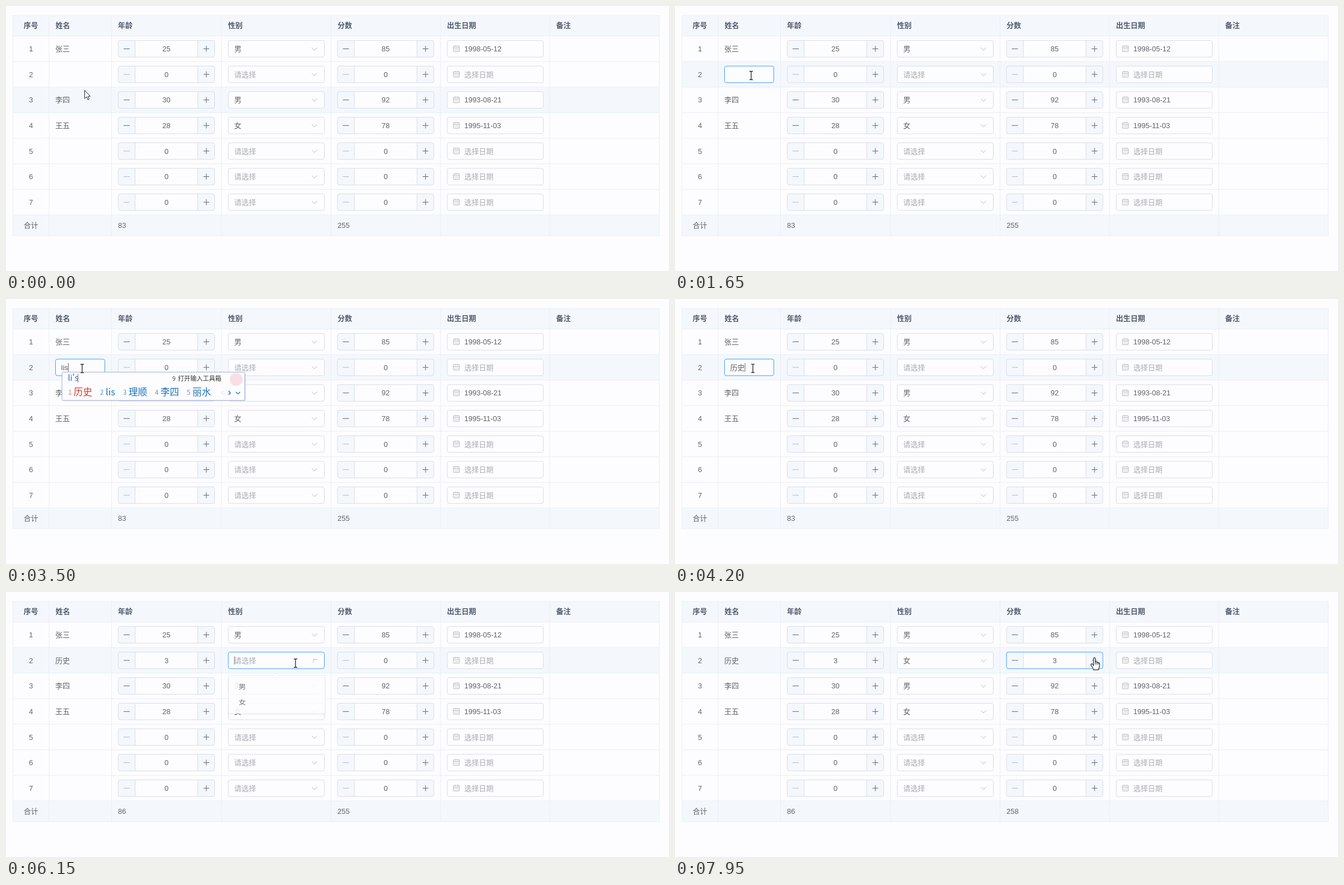
These frames come from a looping animation (1184x473 px, 8000 ms). An HTML page:

```html
<!DOCTYPE html>
<html lang="zh-CN">
<head>
<meta charset="utf-8">
<title>可编辑表格</title>
<style>
  html, body { margin: 0; width: 100%; height: 100%; overflow: hidden; background: #fdfdff; }
  svg { display: block; width: 100vw; height: 100vh; }
  text { font: 13px "Liberation Sans", "Noto Sans CJK SC", "Noto Sans CJK", sans-serif; fill: #606266; white-space: pre; }
  .head { font-weight: 700; fill: #515a6e; }
  .hint { fill: #a8abb2; }
  .ime text { font-family: "Noto Sans CJK SC", "Noto Sans CJK", sans-serif; }
</style>
</head>
<body>
<svg viewBox="0 0 1184 473">
  <g id="hover"></g>
  <g id="base"></g>
  <g id="live"></g>
</svg>
<script>
const LOOP = 8000;
const PAGE = '#fdfdff', SOFT = '#f4f8fd', GRID = '#e9edf7', EDGE = '#d9dce6';
const INK = '#606266', PALE = '#b4b8c0', BLUE = '#409eff', HOVER = '#bcc0cc';
const LEFT = 12.5, RIGHT = 1166.5, TOP = 17, HEAD = 53.5, PITCH = 45.63, FOOT = 373, END = 410;
const COLS = [77, 188.5, 385, 580.5, 776, 971];
const AGE = 200.5, SEX = 397, SCORE = 592, DATE = 788;
const PEOPLE = [
  ['张三', 25, '男', 85, '1998-05-12'],
  null,
  ['李四', 30, '男', 92, '1993-08-21'],
  ['王五', 28, '女', 78, '1995-11-03'],
  ['', 0, '', 0, ''], ['', 0, '', 0, ''], ['', 0, '', 0, '']
];
const midOf = row => 76.4 + PITCH * row;
const ROW2 = midOf(1);

// Times of the user's actions
const EDIT = 1100, COMMIT = 3800, AGE_CLICKS = [5200, 5380, 5560];
const OPEN = 6010, PICK = 6700, SCORE_CLICKS = [7400, 7600, 7820];
const TYPING = [
  [2450, 'l', 'l', 114.5, ['了', '来', '里', '啦', '两']],
  [2650, 'li', 'li', 119, ['里', '李', '力', '离', '理']],
  [2950, 'lis', "li's", 128.5, ['历史', 'lis', '理顺', '李四', '丽水']]
];
const ROW_HOVERS = [[2, -999, 280], [1, 280, 6290], [2, 6910, 7090], [1, 7090, 9999]];
const PATH = [
  [0, 140, 150], [150, 140, 150], [600, 136, 124], [4150, 136, 124], [4850, 341, 121],
  [5050, 356, 118], [5680, 356, 118], [5980, 517, 127], [6200, 517, 127], [6480, 450, 198],
  [6780, 450, 198], [7000, 685, 157], [7250, 749, 118], [LOOP, 749, 118]
];

const clamp = v => Math.max(0, Math.min(1, v));
const smooth = u => u * u * (3 - 2 * u);
const count = (times, t) => times.filter(s => t >= s).length;
const blink = (since, t) => (t - since) % 1060 < 530;

const rect = (x, y, w, h, fill, stroke = 'none', r = 0) =>
  `<rect x="${x}" y="${y}" width="${w}" height="${h}" rx="${r}" fill="${fill}" stroke="${stroke}"/>`;
const line = (d, color, w = 1) => `<path d="${d}" fill="none" stroke="${color}" stroke-width="${w}"/>`;
const text = (x, mid, s, attrs = '') => `<text x="${x}" y="${mid + 4.6}" ${attrs}>${s}</text>`;
const size = (px, color) => `style="font-size:${px}px;fill:${color}"`;
const CENTER = 'text-anchor="middle"';

const box = (x, mid, w, edge, fill = PAGE) => rect(x, mid - 14.8, w, 29.6, fill, edge, 3.5);

function stepper(x, mid, value, edge = EDGE, plus = INK) {
  const a = x + 30, b = x + 142, y = mid;
  return box(x, y, 172, 'none', SOFT) + rect(a, y - 14.8, b - a, 29.6, PAGE) +
    line(`M${a} ${y - 14.8}v29.6M${b} ${y - 14.8}v29.6`, EDGE) + box(x, y, 172, edge, 'none') +
    line(`M${x + 9.5} ${y}h11`, value ? INK : PALE) +
    line(`M${x + 152} ${y}h10.5M${x + 157.25} ${y - 5.25}v10.5`, plus) +
    text(x + 86, y, value, CENTER);
}

function select(mid, value, edge = EDGE, turn = 0) {
  return box(SEX, mid, 171.5, edge) +
    text(SEX + 10.5, mid, value || '请选择', value ? '' : 'class="hint"') +
    `<g transform="translate(551 ${mid}) rotate(${turn})">${line('M-4.7 -2L0 2.6L4.7 -2', PALE)}</g>`;
}

function datePicker(mid, value) {
  const x = DATE + 11, y = mid - 5;
  return box(DATE, mid, 171.5, EDGE) + rect(x, y, 10.5, 10, 'none', PALE, 0.5) +
    line(`M${x} ${y + 3}h10.5M${x + 3} ${y - 1}v2M${x + 7.5} ${y - 1}v2`, PALE) +
    `<path d="M${x + 2} ${y + 5.2}h7M${x + 2} ${y + 7.6}h7" stroke="${PALE}" stroke-dasharray="1.5 1.2"/>` +
    text(DATE + 30.5, mid, value || '选择日期', value ? '' : 'class="hint"');
}

function drawBase() {
  let s = rect(LEFT, TOP, RIGHT - LEFT, HEAD - TOP, SOFT) + rect(LEFT, FOOT, RIGHT - LEFT, END - FOOT, SOFT);
  s += rect(LEFT, TOP, RIGHT - LEFT, END - TOP, 'none', GRID);
  for (const x of COLS) s += line(`M${x} ${TOP}V${END}`, GRID);
  for (let i = 0; i < 8; i++) s += line(`M${LEFT} ${HEAD + PITCH * i}H${RIGHT}`, GRID);
  s += text(44.5, 34.6, '序号', `class="head" ${CENTER}`);
  ['姓名', '年龄', '性别', '分数', '出生日期', '备注'].forEach((name, i) => {
    s += text(COLS[i] + 11.5, 34.6, name, 'class="head"');
  });
  PEOPLE.forEach((p, i) => {
    const y = midOf(i);
    s += text(44.5, y, i + 1, CENTER);
    if (p) s += text(88, y, p[0]) + stepper(AGE, y, p[1]) + select(y, p[2]) +
      stepper(SCORE, y, p[3]) + datePicker(y, p[4]);
  });
  return s + text(44.5, 391.4, '合计', CENTER);
}

function pointer(t) {
  const i = Math.max(1, PATH.findIndex(p => p[0] > t));
  const [t0, x0, y0] = PATH[i - 1], [t1, x1, y1] = PATH[i];
  const u = smooth(clamp((t - t0) / (t1 - t0)));
  return [x0 + (x1 - x0) * u, y0 + (y1 - y0) * u];
}

// Which part of the table is under the pointer
function target(x, y, t) {
  const over = (a, w) => x > a && x < a + w;
  if (t > OPEN && t < PICK + 50 && over(SEX, 172) && y > 149) return 'option';
  const row = Math.round((y - midOf(0)) / PITCH);
  if (Math.abs(y - midOf(row)) > 15) return '';
  if (over(88, 89) && row === 1 && t >= EDIT && t < AGE_CLICKS[0]) return 'name';
  if (over(AGE, 172)) return over(AGE + 30, 112) ? 'age' : 'age button';
  if (over(SEX, 172)) return 'sex';
  if (over(SCORE, 172)) return over(SCORE + 30, 112) ? 'score' : 'score button';
  return '';
}

function cursor(x, y, part) {
  let s;
  if (/button|option/.test(part)) {
    s = `<path d="M-1.6 1.2C-1.6 -1.2 1.6 -1.2 1.6 1.2V7C2.4 5.8 4.3 6.2 4.5 7.6C5.3 6.8 6.9 7.2 7 8.6
      C8 8 9.2 8.8 9.2 10V14C9.2 17 7.4 17.6 7.4 20.8H-1.6C-1.6 18.2 -4 16 -6 12.6
      C-7 10.6 -4.4 9.4 -3.2 11L-1.6 13Z" fill="#fff" stroke="#222" stroke-width="1.2"/>` +
      line('M1.6 7v4.5M4.5 8v3.5M7 9v2.5', '#222');
  } else if (part) {
    const beam = 'M-3 -7.5H-1L0 -6.7L1 -7.5H3M0 -6.7V6.7M-3 7.5H-1L0 6.7L1 7.5H3';
    s = line(beam, '#fff', 2.4) + line(beam, '#222', 1.3);
  } else {
    s = '<path d="M0.5 0.5V15.2L3.9 12L6.3 17.4L8.6 16.4L6.2 11.2H10.6Z" fill="#fff" stroke="#222"/>';
  }
  return `<g transform="translate(${x} ${y})">${s}</g>`;
}

function ime([, , spell, caretX, words]) {
  let s = rect(101, 132, 327, 50, '#8890b0', 'none', 2).replace('/>', ' opacity=".3"/>') +
    rect(100, 130.5, 326.5, 50.5, '#fdfdff', '#9fb0dc', 2);
  s += text(110.5, 141.5, spell, size(14.5, '#1f6fb8')) + line(`M${caretX} 134v15`, '#d04040');
  s += text(297, 141, '9', size(10.5, '#444')) + text(307, 141, '打开输入工具箱', size(11.1, '#333'));
  s += '<circle cx="411" cy="143.5" r="11.5" fill="#f8dfe6"/>';
  let x = 111;
  words.forEach((word, i) => {
    const color = i ? '#1a72b8' : '#d03a2c';
    s += text(x, 166, i + 1, size(11.5, i ? '#5b95c8' : '#dd7a70')) + text(x + 10, 167, word, size(16.5, color));
    x += 24 + (word === 'lis' ? 17 : 16.5 * word.length);
  });
  s += line('M388 164l-3 3.5l3 3.5', '#d4dae8') + line('M397.5 164l3.2 3.5l-3.2 3.5', '#1a72b8', 1.4) +
    line('M410.5 166l3.8 3.4l3.8 -3.4', '#1a72b8', 1.4);
  return `<g class="ime">${s}</g>`;
}

function dropdown(t, y) {
  const shown = t < PICK ? 1 - (1 - clamp((t - OPEN - 40) / 300)) ** 5 : (1 - clamp((t - PICK) / 250)) ** 3;
  if (shown <= 0.01) return '';
  const hot = y > 149 + 7 && y < 149 + 71 ? Math.floor((y - 156) / 31.7) : -1;
  let s = rect(SEX - 1, 1.5, 175, 77, '#404860', 'none', 4).replace('/>', ' opacity=".06"/>') +
    rect(SEX, 0, 173, 76, PAGE, '#e4e7ed', 3.5) +
    `<path d="M478.5 .5L483.5 -4.5L488.5 .5" fill="${PAGE}" stroke="#e4e7ed"/>`;
  ['男', '女'].forEach((name, i) => {
    if (i === hot) s += rect(SEX + 0.5, 6.5 + 31.7 * i, 172, 31.7, SOFT);
    s += text(415.5, 22.3 + 31.7 * i, name, t >= PICK && i ? `style="fill:${BLUE};font-weight:700"` : '');
  });
  const scale = 0.2 + 0.8 * shown;
  return `<g transform="translate(0 148.7) scale(1 ${scale})" opacity="${shown}">${s}</g>`;
}

function nameCell(t) {
  if (t < EDIT) return '';
  if (t >= AGE_CLICKS[0]) return text(88, ROW2, '历史');
  const typed = TYPING.filter(k => t >= k[0]).pop();
  const done = t >= COMMIT;
  const value = done ? '历史' : typed ? typed[1] : '';
  const width = done ? 26 : [0, 2.9, 5.8, 12.3][value.length];
  const since = done ? COMMIT : typed ? typed[0] : EDIT;
  const caret = (typed && !done) || blink(since, t);
  return box(88.5, ROW2, 88, BLUE) + text(98.5, ROW2, value) +
    (caret ? line(`M${98.5 + width + 0.5} ${ROW2 - 7.5}v15`, INK) : '');
}

function drawLive(t) {
  const [x, y] = pointer(t);
  const part = target(x, y, t);
  const here = y < 145;
  const age = count(AGE_CLICKS, t), score = count(SCORE_CLICKS, t);
  const edge = (key, focused) => focused ? BLUE : here && part.startsWith(key) ? HOVER : EDGE;
  const plus = key => part === key + ' button' ? BLUE : INK;
  const sexFocus = t >= OPEN && t < SCORE_CLICKS[0];
  const ease = u => 1 - (1 - u) ** 2.3;
  const turn = 180 * (ease(clamp((t - OPEN) / 300)) - ease(clamp((t - PICK) / 300)));

  let s = stepper(AGE, ROW2, age, edge('age', age && t < OPEN), plus('age')) +
    select(ROW2, t >= PICK ? '女' : '', edge('sex', sexFocus), turn) +
    stepper(SCORE, ROW2, score, edge('score', score), plus('score')) +
    datePicker(ROW2, '') + nameCell(t);
  if (sexFocus && blink(t < PICK ? OPEN : PICK, t)) s += line(`M408 ${ROW2 - 7.5}v15`, INK);
  if (!here && part === 'score') s += box(SCORE, midOf(2), 172, HOVER, 'none');
  s += text(200, 391.4, 83 + age) + text(592, 391.4, 255 + score);
  if (t >= OPEN) s += dropdown(t, y);
  const typed = TYPING.filter(k => t >= k[0]).pop();
  if (typed && t < COMMIT) s += ime(typed);
  return s + cursor(x, y, part);
}

function drawHover(t) {
  return ROW_HOVERS.map(([row, from, to]) => {
    const level = clamp((t - from) / 250) - clamp((t - to) / 250);
    const bar = rect(LEFT, HEAD + PITCH * row, RIGHT - LEFT, PITCH, SOFT);
    return level > 0 ? `<g opacity="${level}">${bar}</g>` : '';
  }).join('');
}

const [hover, base, live] = ['hover', 'base', 'live'].map(id => document.getElementById(id));
base.innerHTML = drawBase();
const start = performance.now();
function frame() {
  const t = (performance.now() - start) % LOOP;
  hover.innerHTML = drawHover(t);
  live.innerHTML = drawLive(t);
  requestAnimationFrame(frame);
}
frame();
</script>
</body>
</html>
```
